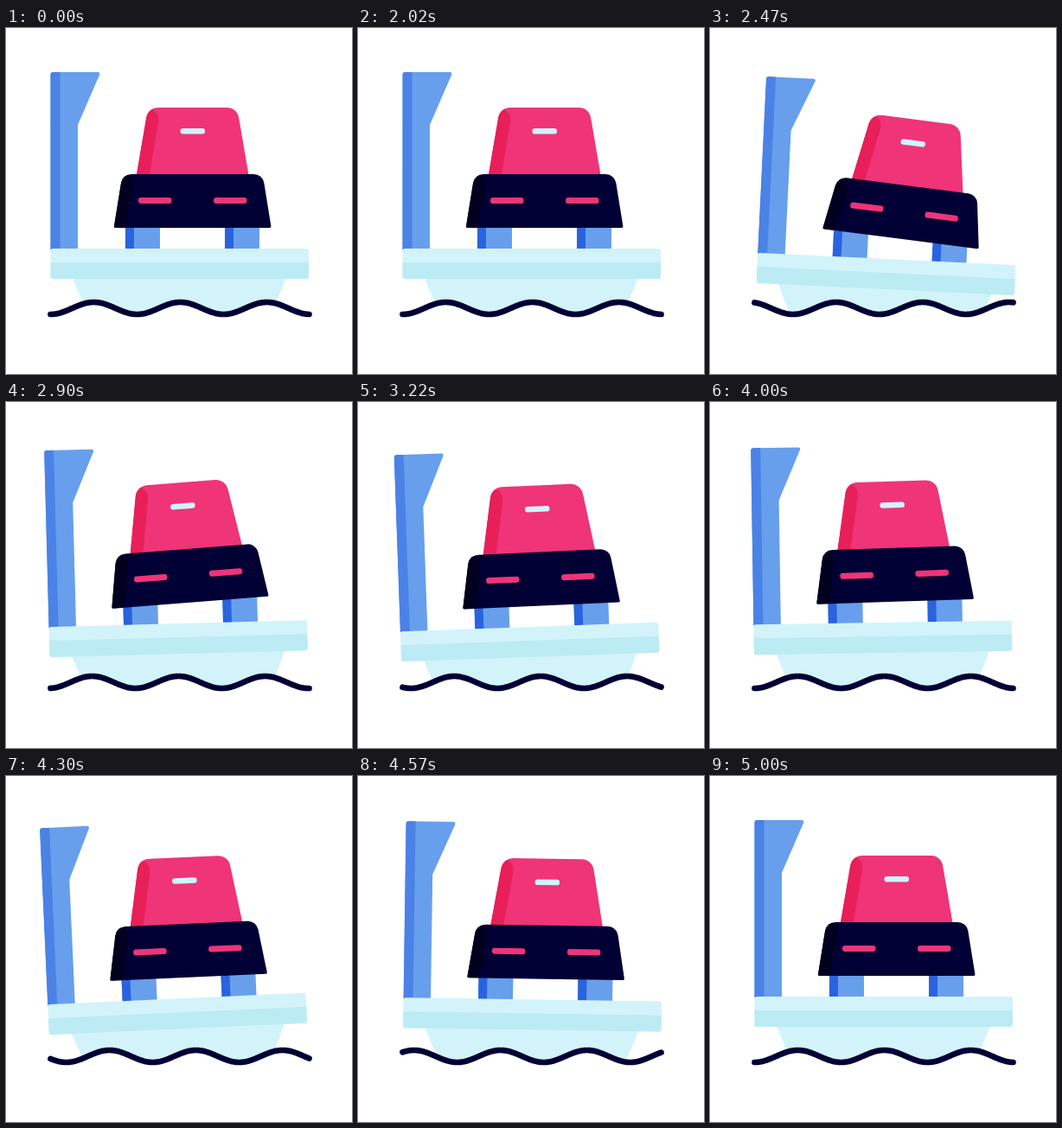
Animation of 400x400 px, one loop 5.02 s. Source, as an HTML page with a canvas:

```html
<!DOCTYPE html>
<html lang="en">
<head>
<meta charset="utf-8">
<title>Ferry</title>
<style>
  html, body { margin: 0; width: 100%; height: 100%; overflow: hidden; background: #fff; }
  canvas { display: block; width: 400px; height: 400px; }
</style>
</head>
<body>
<canvas id="stage"></canvas>
<script>
const canvas = document.getElementById('stage');
const ctx = canvas.getContext('2d');
const ratio = window.devicePixelRatio || 1;
canvas.width = canvas.height = Math.round(400 * ratio);

const LOOP = 5020, START = 2000, RIDE = 3000;
const ICE = '#d2f3fa', ICE_DARK = '#bcebf3';
const BLUE = '#679fec', BLUE_MID = '#4a82e6', BLUE_DARK = '#2a63de';
const PINK = '#ef3478', PINK_DARK = '#e81f59';
const NAVY = '#000034', NAVY_DARK = '#00001f';

const { PI, sin, cos } = Math;
const clamp = (v, lo, hi) => Math.min(hi, Math.max(lo, v));
const easeSine = p => (1 - cos(PI * clamp(p, 0, 1))) / 2;
const easeQuad = p => p < 0.5 ? 2 * p * p : 1 - 2 * (1 - p) * (1 - p);

// Motion rules; u is the time since the ride began, angles in degrees
function tiltAt(u) {
  const level = easeSine(u / 510) * easeSine((RIDE - u) / 430);
  return 2.8 * level * cos(PI * Math.max(0, u - 510) / 573);
}
const bobAt = u => (u < 2000 ? 12 : 3.6) * sin(PI * u / 1000) ** 2;
const swayAt = u => -5.8 * Math.max(0, 1 - u / 2400) * easeSine(u / 500) * cos(PI * u / 500);
const shiftAt = u => 100 * easeQuad(u % 1000 / 1000);

function rotateAt(x, y, deg) {
  ctx.translate(x, y);
  ctx.rotate(deg * PI / 180);
  ctx.translate(-x, -y);
}

function rect(color, x, y, w, h) {
  ctx.fillStyle = color;
  ctx.fillRect(x, y, w, h);
}

// Fills a polygon of [x, y, radius] corners
function fill(color, points) {
  const n = points.length, a = points[n - 1], b = points[0];
  ctx.beginPath();
  ctx.moveTo((a[0] + b[0]) / 2, (a[1] + b[1]) / 2);
  points.forEach(([x, y, r = 0], i) => {
    const next = points[(i + 1) % n];
    ctx.arcTo(x, y, next[0], next[1], r);
  });
  ctx.closePath();
  ctx.fillStyle = color;
  ctx.fill();
}

// Fills an outline, then paints the details inside it
function clipped(color, points, details) {
  ctx.save();
  fill(color, points);
  ctx.clip();
  details();
  ctx.restore();
}

const box = (x, y, w, h, r) => [[x, y, r], [x + w, y, r], [x + w, y + h, r], [x, y + h, r]];
const bar = (color, x, y, w, h) => fill(color, box(x, y, w, h, h * 0.45));

// Symmetric about the middle x, narrower at the top
const trapezoid = (mid, top, bottom, y0, y1, r0, r1 = 0) => [
  [mid - bottom, y1, r1], [mid - top, y0, r0], [mid + top, y0, r0], [mid + bottom, y1, r1]
];

function waveLine(shift) {
  for (let x = 51.5; x <= 350.5; x++) {
    ctx.lineTo(x, 324 - 7 * cos((x - 101.5 - shift) * PI / 50));
  }
}

function mast() {
  const outline = [[51.5, 51, 3], [109.5, 51, 2], [83, 112, 4], [83, 256], [51.5, 256]];
  clipped(BLUE, outline, () => rect(BLUE_MID, 51, 50, 11.5, 207));
}

function leg(x) {
  rect(BLUE, x, 225, 40, 31);
  rect(BLUE_DARK, x, 225, 10, 31);
}

function car() {
  clipped(PINK, trapezoid(215.7, 51.5, 65, 92, 171, 14), () =>
    fill(PINK_DARK, [[140, 171], [140, 92], [179, 92, 14], [165.5, 171]]));
  bar(ICE, 201.5, 116, 28.5, 6.5);

  clipped(NAVY, trapezoid(215.7, 81, 91, 169, 231, 12, 1.5), () =>
    fill(NAVY_DARK, [[120, 231], [120, 169], [149, 169, 12], [138.5, 231]]));
  for (const x of [153, 240]) bar(PINK, x, 196, 38.5, 7);
}

function deck() {
  clipped(ICE, box(51.5, 255, 298.5, 35, 3), () => rect(ICE_DARK, 51, 271, 300, 20));
}

function draw(t) {
  const u = clamp(t - START, 0, RIDE);
  const shift = shiftAt(u);
  const ride = () => {
    ctx.translate(0, bobAt(u));
    rotateAt(200, 330, tiltAt(u));
  };

  ctx.setTransform(ratio, 0, 0, ratio, 0, 0);
  rect('#fff', 0, 0, 400, 400);

  // The hull shows only above the water
  ctx.save();
  ctx.beginPath();
  waveLine(shift);
  ctx.lineTo(350.5, 0);
  ctx.lineTo(51.5, 0);
  ctx.clip();
  ride();
  fill(ICE, trapezoid(200.5, 102.5, 124, 340, 288, 0));
  ctx.restore();

  ctx.save();
  ride();
  mast();
  leg(138);
  leg(253);
  ctx.save();
  rotateAt(215.5, 231, swayAt(u));
  car();
  ctx.restore();
  deck();
  ctx.restore();

  ctx.beginPath();
  waveLine(shift);
  ctx.strokeStyle = NAVY;
  ctx.lineWidth = 6.7;
  ctx.lineCap = ctx.lineJoin = 'round';
  ctx.stroke();
}

const begin = performance.now();
function tick() {
  draw((performance.now() - begin) % LOOP);
  requestAnimationFrame(tick);
}
tick();
</script>
</body>
</html>
```
